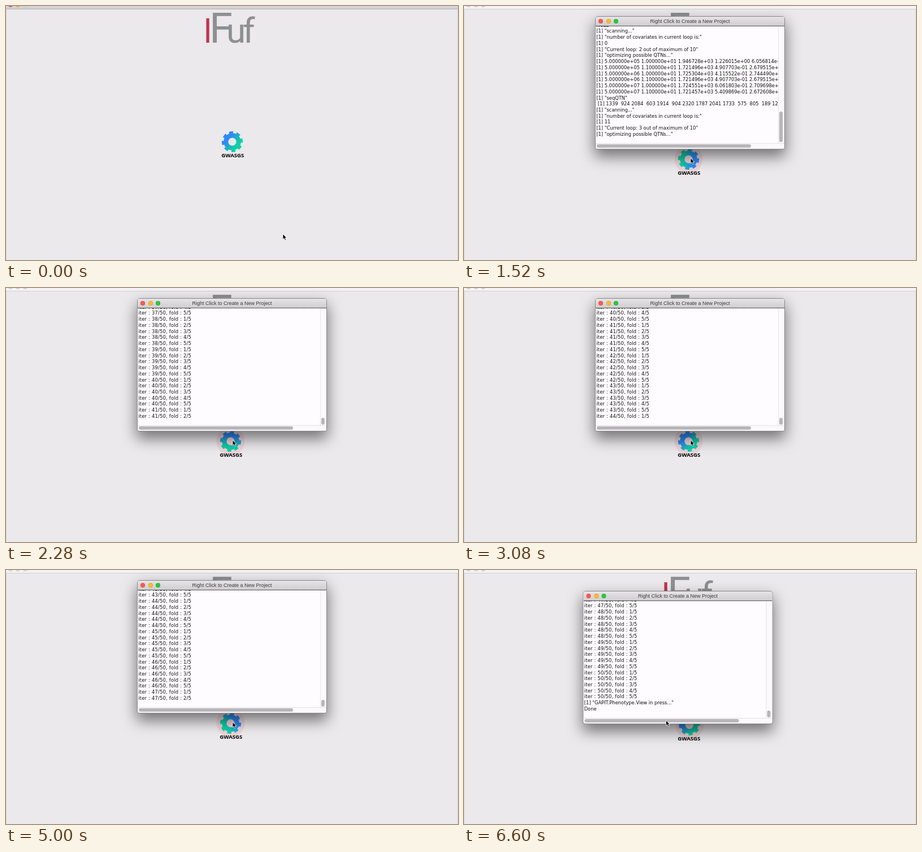
Animation of 800 by 450 pixels, one loop 6680 ms. Source, as an HTML page:

```html
<!DOCTYPE html>
<html lang="en">
<head>
<meta charset="utf-8">
<title>Analysis run</title>
<style>
  html, body { margin: 0; width: 100%; height: 100%; overflow: hidden; }
  #stage { position: relative; width: 800px; height: 450px; overflow: hidden; background: #ebe9eb; }
  #stage > * { position: absolute; }
  #edge { inset: 0; border: solid #d9d7d9; border-width: 0 1px; }
  #bar { left: 0; top: 0; width: 800px; height: 5px; background: linear-gradient(#d9d7d9, #cfcdcf); border-bottom: 1px solid #b4b2b4; }
  #bar.idle { background: #f4f2f4; border-color: #d2d0d2; }
  #bar .dot { top: -5.6px; }
  .dot { position: absolute; width: 8px; height: 8px; border-radius: 50%; box-shadow: inset 0 0 0 .5px #0003; }
  .red { background: #fb5850; }
  .amber { background: #fdb92d; }
  .green { background: #29c83f; }
  .grey, .idle .dot { background: #dcdadc; }
  svg { left: 0; top: 0; overflow: visible; }
  #logo { font-family: Roboto, sans-serif; fill: #8d8f93; }
  #label { font: 600 9.6px "Noto Sans", sans-serif; text-anchor: middle; }
  #win, #shade { left: 233px; top: 19px; width: 334px; height: 234px; border-radius: 4px 4px 3px 3px; }
  #win { background: #fefcfe; overflow: hidden; }
  #shade { box-shadow: 0 0 0 1px #8a888a, 0 12px 26px 2px #00000080; }
  #win > * { position: absolute; }
  #title { left: 0; right: 0; top: 0; height: 16px; background: linear-gradient(#e6e4e6, #cfcdcf); border-bottom: 1px solid #555; font: 9px/16px "Liberation Sans", Arial, sans-serif; text-align: center; color: #3c3c3c; }
  #title .dot { top: 4px; }
  #view { left: 0; top: 17px; width: 323px; height: 207px; overflow: hidden; }
  #log { position: absolute; margin: 0; left: 1.2px; font: 8.33px/10.73px "DejaVu Sans", sans-serif; color: #111; }
  #log b { font-weight: 400; letter-spacing: 2.1px; }
  #log i { font-style: normal; letter-spacing: .22px; }
  #vtrack { left: 323px; top: 17px; width: 10px; height: 207px; border-left: 1px solid #e4e2e4; background: #fbf9fb; }
  #htrack { left: 0; top: 224px; width: 334px; height: 10px; border-top: 1px solid #e4e2e4; background: #fbf9fb; }
  .thumb { border-radius: 3px; background: #b8b6b8; }
  #vthumb { left: 325.3px; width: 5.6px; }
  #hthumb { left: 2px; top: 226px; width: 273px; height: 5.6px; }
</style>
</head>
<body>
<div id="stage">
  <div id="edge"></div>
  <div id="bar">
    <span class="dot red" style="left:4px"></span>
    <span class="dot amber" style="left:17px"></span>
    <span class="dot grey" style="left:30px"></span>
  </div>
  <svg width="800" height="450">
    <defs>
      <linearGradient id="hue" gradientUnits="userSpaceOnUse" x1="-11" y1="-9" x2="11" y2="9">
        <stop offset=".15" stop-color="#2e88f8"/>
        <stop offset=".85" stop-color="#10cfa6"/>
      </linearGradient>
    </defs>
    <g id="logo">
      <text x="350" y="65" font-size="58" fill="#c0324f">l</text>
      <text x="360" y="65" font-size="74">F</text>
      <text x="390" y="65" font-size="62">u</text>
      <text x="419" y="65" font-size="62">f</text>
    </g>
    <g id="node">
      <circle id="halo" r="25" fill="#edd4d8"/>
      <g id="gear" fill="none" stroke="url(#hue)">
        <circle r="11.2" stroke-width="8.2"/>
        <circle r="16.6" stroke-width="4" pathLength="16" stroke-dasharray="1.1 .9" stroke-dashoffset=".86"/>
      </g>
    </g>
    <text id="label">GWASGS</text>
  </svg>
  <div id="shade"></div>
  <div id="win">
    <div id="title">
      <span class="dot red" style="left:5px"></span>
      <span class="dot amber" style="left:18.5px"></span>
      <span class="dot green" style="left:32px"></span>
      Right Click to Create a New Project
    </div>
    <div id="view"><pre id="log"></pre></div>
    <div id="vtrack"></div>
    <div id="htrack"></div>
    <div id="vthumb" class="thumb"></div>
    <div id="hthumb" class="thumb"></div>
  </div>
  <svg width="10" height="14">
    <path id="cursor" d="M0 0V9.4L2.2 7.4 3.8 11 5.5 10.3 4 6.8H6.8Z" fill="#000" stroke="#fff" stroke-width=".8"/>
  </svg>
</div>
<script>
const LOOP = 6680, STEP = 40, ROWS = 19;
const OPEN = 760, ITER = 2240, REPEAT = 4120, DONE = 5120;
const SPIN = .375, RATE = .017;
const $ = id => document.getElementById(id);

// Console output of the first stage
const out = s => `[1] "${s}"`;
const dash = `<b>${"-".repeat(22)}</b>`;
const row = (bin, n, rest) => `[1] 5.000000e+0${bin} 1.${n}00000e+01 ${rest}e+02 1.107243e+00`;
const current = n => out(`Current loop: ${n} out of maximum of 10`);
const fits = ["1.725304e+03 4.115522e-01 2.744490", "1.721496e+03 4.907703e-01 2.679515"];
const fine = ["1.724551e+03 6.061803e-01 2.709698", "1.721457e+03 5.409869e-01 2.672608"];
const search = () => [5, 6, 7].flatMap(bin => (bin < 7 ? fits : fine).map((f, i) => row(bin, i, f)));
const scan = (count, next) => [
  out("scanning..."), out("number of covariates in current loop is:"), `[1] ${count}`,
  current(next), out("optimizing possible QTNs...")
];
const picks = " [1] 1339  924 2084  603 1914  904 2320 1787 2041 1733  575  805  189 1254 2210";
const steps = ["Loading libraries", "Loading phenotype", "Checking covariates", "Loading genotype",
  "Loading map", "Subsetting phenotype", "Subsetting covariates"];
const first = [
  "Method:", " ".repeat(9) + "FarmCPU",
  ...steps.map(s => `   ${s} ...Done`),
  out(`${dash} Welcome to FarmCPU ${dash}`), out("FarmCPU Started..."),
  current(1), out("seqQTN"), "NULL", ...scan(0, 2),
  "[1] 5.000000e+05 1.000000e+01 1.946728e+03 1.226015e+00 6.056814e+02",
  ...search().slice(1), out("seqQTN"), picks, ...scan(11, 3),
  ...search(), out("seqQTN"), picks, "[16]  119", ...scan(16, 4),
  ...search(), out("seqQTN"), picks, "[16]  119", ...scan(17, 5), ...search()
];

// Console output of the cross validation
const iter = k => `<i>iter : ${Math.floor(k / 5) + 1}/50, fold : ${k % 5 + 1}/5</i>`;
const iters = (from, to) => Array.from({ length: to - from + 1 }, (_, i) => iter(from + i));

function consoleAt(t) {
  if (t < ITER) {
    const n = Math.max(0, Math.floor(20 + (t - 1240) / 23));
    return { lines: first.slice(Math.max(0, n - ROWS), n), total: n + 1 + Math.max(0, n - 20) * 3.3 };
  }
  if (t >= DONE)
    return { lines: [...iters(233, 249), out("GAPIT.Phenotype.View in press..."), "Done"], total: 400 };
  const [at, base] = t < REPEAT ? [3080, 215] : [5000, 231];
  const k = Math.floor(base + (t - at) * RATE + .01);
  return { lines: iters(k - ROWS + 1, k), total: 140 + k };
}

function angleAt(t) {
  if (t < OPEN || t >= DONE) return 0;
  const [at, base] = t < ITER ? [1240, 45] : t < REPEAT ? [3080, 0] : [5000, 105];
  return base + (t - at) * SPIN;
}

// Eased travel through [time, x, y] stops
function along(stops, t) {
  let a = stops[0];
  for (const b of stops) {
    if (t < b[0]) {
      const u = (t - a[0]) / (b[0] - a[0]), e = u * u * (3 - 2 * u);
      return [a[1] + (b[1] - a[1]) * e, a[2] + (b[2] - a[2]) * e];
    }
    a = b;
  }
  return [a[1], a[2]];
}
const pointer = [[0, 490, 404], [440, 404, 238.5], [500, 404, 238.5], [660, 401, 269.5], [5680, 401, 269.5],
  [5920, 430, 26], [5960, 430, 26], [6320, 408.5, 45], [6360, 408.5, 45], [6600, 357.5, 266.5]];
const icon = [[0, 400.5, 240.5], [500, 400.5, 240.5], [660, 397.5, 271.5]];
const frame = [[0, 0, 0], [5960, 0, 0], [6320, -21.5, 19]];

const move = (id, [x, y]) => $(id).setAttribute("transform", `translate(${x} ${y})`);

function draw(t) {
  const open = t >= OPEN, shift = t >= DONE ? 3 : 0;
  const [x, y] = along(icon, t);
  move("node", [x + shift / 2, y + shift]);
  move("label", [x + .8, y + shift + 27.5]);
  move("cursor", along(pointer, t));
  $("gear").setAttribute("transform", `rotate(${angleAt(t)})`);
  $("halo").style.visibility = t >= 480 ? "visible" : "hidden";
  $("bar").className = open ? "idle" : "";

  const [dx, dy] = along(frame, t);
  for (const id of ["win", "shade"]) {
    $(id).style.visibility = open ? "visible" : "hidden";
    $(id).style.transform = `translate(${dx}px, ${dy}px)`;
  }
  if (!open) return;
  const { lines, total } = consoleAt(t);
  $("log").innerHTML = lines.join("\n");
  $("log").style.top = lines.length < ROWS ? "1px" : "-7.3px";
  const h = Math.max(12, 3976 / total);
  $("vthumb").style.height = h + "px";
  $("vthumb").style.top = 222.5 - h + "px";
  $("vthumb").style.display = h < 206 ? "block" : "none";
}

const start = performance.now();
let last = -1;
function tick() {
  const now = (performance.now() - start) % LOOP;
  const t = Math.min(LOOP - 2 * STEP, Math.floor(now / STEP) * STEP);
  if (t !== last) draw(last = t);
  requestAnimationFrame(tick);
}
tick();
</script>
</body>
</html>
```
